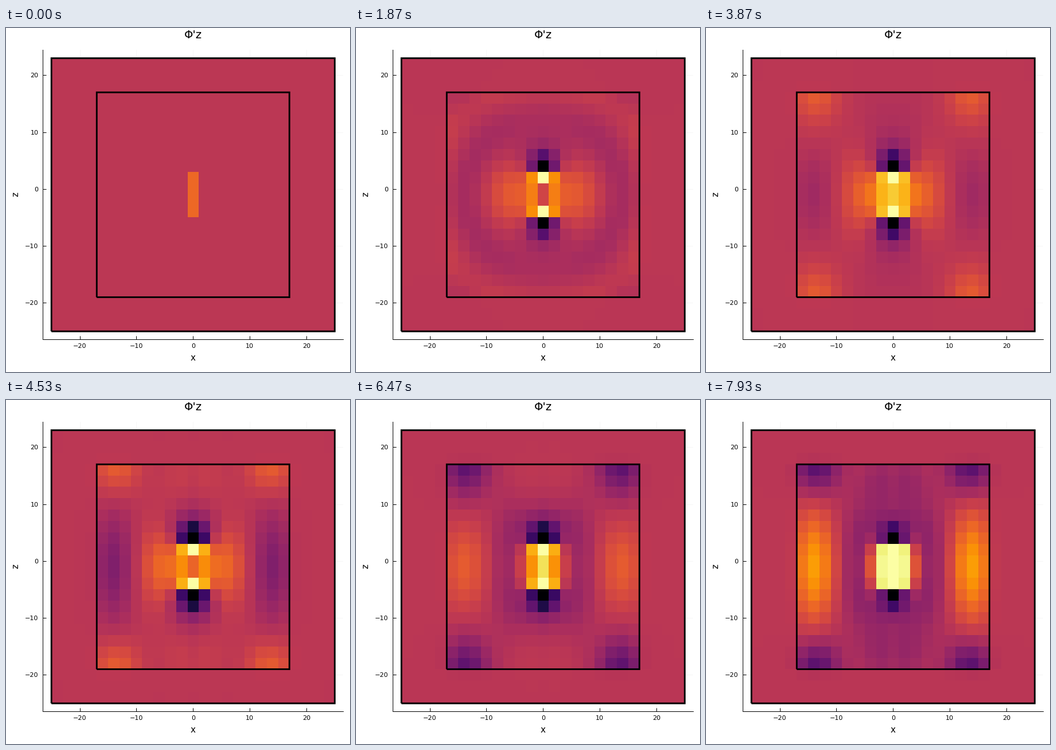
Recreate the animation shown at these times as a matplotlib script. Size 600 by 600 pixels, loop 8000 ms.

```python
import numpy as np
import matplotlib.pyplot as plt
from matplotlib.animation import FuncAnimation

SIZE, DPI = 600, 100
FRAMES, LOOP_MS = 120, 8000

plt.rcParams["font.family"] = "DejaVu Sans"

# Distance of every cell from the antenna centre, in cells
X, Y = np.meshgrid(np.abs(np.arange(25) - 12.0), np.abs(np.arange(24) - 11.5))
R = np.hypot(X, Y)
EQUATOR = (X / R) ** 2
ROD = (X == 0) & (Y < 2)
# The outer layer swallows the waves
LAYER = np.exp(-1.8 * np.clip(X - 8, 0, None) - 3 * np.clip(Y - 8.5, 0, None))


def charge(dy):
    return dy / (X ** 2 + dy ** 2) ** 1.5


def lobe(x, y, wx, wy):
    return np.exp(-((X - x) / wx) ** 2 - ((Y - y) / wy) ** 2)


def shell(radius, width):
    return np.exp(-((R - radius) / width) ** 2)


def cycle(t, crest, period):
    return np.cos(2 * np.pi * (t - crest) / period)


DIPOLE = charge(Y + 2) - charge(Y - 2)

# Standing waves: the driven one, and the slow beat of the box
DRIVEN = (0.43 * lobe(0, 0, 1.8, 2.4) + 0.13 * lobe(7, 0, 1.7, 9)
          - 0.11 * lobe(1, 7.5, 2, 2.8))
BEAT = (0.25 * lobe(3, 0, 1.6, 4.2) - 0.27 * lobe(7, 0, 1.8, 4)
        + 0.4 * lobe(6.8, 9, 2, 2.7))


def first_wave(t):
    """Rings that run out from the rod before the standing waves build."""
    radius = 6.8 + 0.28 * (t - 28)
    level = np.clip(min(t / 14, (46 - t) / 18), 0, 1)
    return level * (0.04 * shell(radius + 3.2, 1.3)
                    - (0.028 + 0.045 * EQUATOR) * shell(radius, 1.5)
                    + 0.1 * EQUATOR * shell(radius - 3.6, 1.6))


def field(t):
    drive = cycle(t, 50.5, 36)
    growth = (t / FRAMES) ** 1.5
    ends = (0.9 - 0.12 * drive) * (1 - np.exp(-t / 30))
    kick = (0.523 + 0.05 * t) * np.exp(-(t / 14) ** 2)
    rod = 0.12 * drive - 0.26 + 0.35 * growth + kick
    waves = growth * (drive * DRIVEN + cycle(t, 62, 90) * BEAT)
    return LAYER * (ends * DIPOLE + rod * ROD + waves + first_wave(t))


fig = plt.figure(figsize=(SIZE / DPI, SIZE / DPI), dpi=DPI, facecolor="white")
LEFT, RIGHT, TOP, BOTTOM = 64.4, 588.2, 38.4, 543.4
ax = fig.add_axes([LEFT / SIZE, 1 - BOTTOM / SIZE,
                   (RIGHT - LEFT) / SIZE, (BOTTOM - TOP) / SIZE])

# Cell edges fall on the pixel below, so nudge the image by half a pixel
NUDGE = 0.045
image = ax.imshow(field(0), cmap="inferno", vmin=-0.5, vmax=0.5, origin="lower",
                  extent=(-25 - NUDGE, 25 - NUDGE, -25 + NUDGE, 23 + NUDGE),
                  aspect="auto", interpolation="nearest", zorder=2)


def box(x0, x1, z0, z1):
    ax.plot([x0, x1, x1, x0, x0], [z0, z0, z1, z1, z0], color="black", lw=2.1,
            solid_capstyle="butt", solid_joinstyle="miter", snap=False, zorder=3)


box(-25, 25, -25, 23)
box(-17, 17, -19, 17)

ax.set_xlim(-26.5, 26.5)
ax.set_ylim(-26.44, 24.44)
ticks = range(-20, 21, 10)
ax.set_xticks(ticks)
ax.set_yticks(ticks)
ax.tick_params(direction="in", length=4.3, width=0.72,
               labelbottom=False, labelleft=False)
ax.set_axisbelow(True)
ax.grid(color="black", alpha=0.05, lw=0.5)
for side in ("top", "right"):
    ax.spines[side].set_visible(False)
for side in ("left", "bottom"):
    ax.spines[side].set_linewidth(0.72)


def label(x, y, text, size, ha="center", turn=0):
    fig.text(x / SIZE, 1 - y / SIZE, text, fontsize=size, ha=ha, va="baseline",
             rotation=turn, rotation_mode="anchor", color="black")


for v in ticks:
    text = str(v).replace("-", "\u2212")
    px = LEFT + (v + 26.5) / 53 * (RIGHT - LEFT)
    py = TOP + (24.44 - v) / 50.88 * (BOTTOM - TOP)
    label(px, 558.5, text, 8)
    label(56.5, py + 4, text, 8, ha="right")
label(326.3, 18, "\u03a6'z", 14)
label(326.3, 579.5, "x", 11)
label(21.5, 290.4, "z", 11, turn=90)


def draw(n):
    image.set_data(field(n))
    return (image,)


anim = FuncAnimation(fig, draw, frames=FRAMES, interval=LOOP_MS / FRAMES,
                     repeat=True, repeat_delay=0, blit=False)
plt.show()
```
